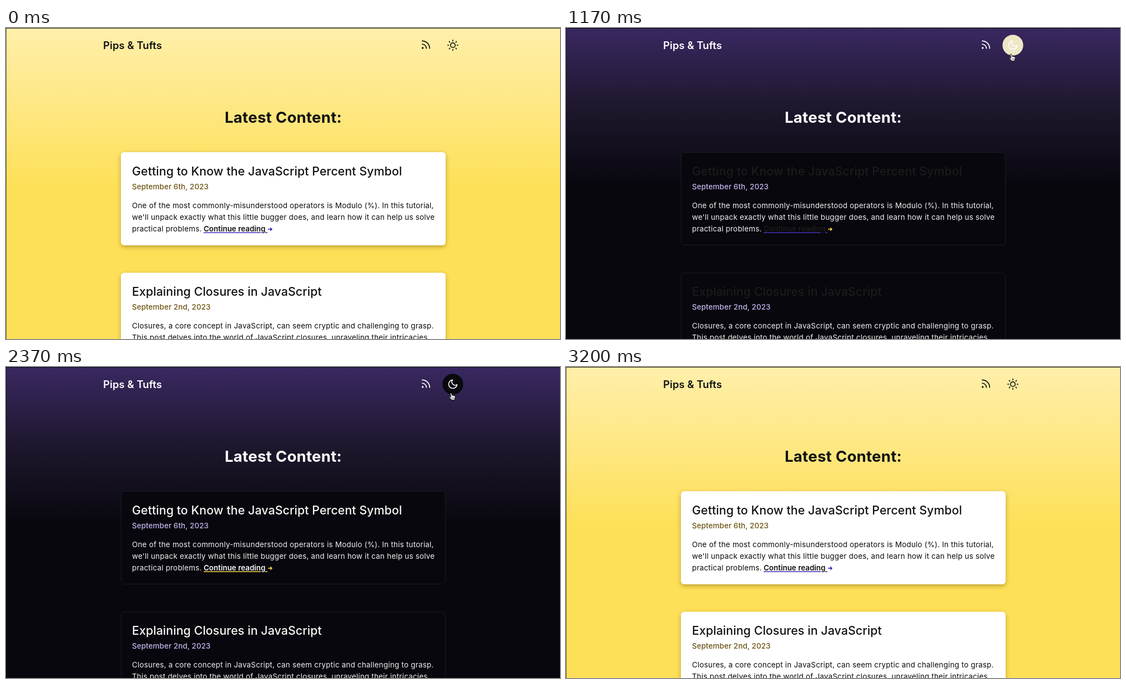
Write an HTML page with a canvas that moves like this. It is 998x561 px and loops after 3530 ms.

```html
<!DOCTYPE html>
<html lang="en">
<head>
<meta charset="utf-8">
<title>Theme toggle</title>
<style>
  html, body { margin: 0; width: 100%; height: 100%; overflow: hidden; }
  canvas { display: block; }
</style>
</head>
<body>
<canvas id="stage" width="998" height="561"></canvas>
<script>
const ctx = document.getElementById('stage').getContext('2d');
const W = 998, H = 561, LOOP = 3530;
const TO_DARK = 1170, TO_LIGHT = 2500, FADE = 200;
const BUTTON = { x: 805, y: 31, r: 18.7 };

const LIGHT = {
  sky: [255, 239, 170], middle: [254, 231, 128], ground: [254, 224, 88],
  ink: '#111111', body: '#0c0c0c', date: '#6b5312', arrow: '#3a14b4',
  edge: 'rgba(40,35,20,.7)', top: '#2a2618'
};
const DARK = {
  sky: [57, 40, 97], middle: [29, 22, 43], ground: [8, 7, 14],
  ink: '#ffffff', body: '#f1f1f3', date: '#c6b6ee', arrow: '#ffda4c',
  edge: 'rgba(0,0,0,.6)', top: '#08070c'
};
// Properties that fade between themes instead of switching at once
const FADING = {
  link: [[17, 17, 17], [247, 247, 247]],
  underline: [[64, 42, 188], [255, 218, 76]],
  button: [[248, 241, 207], [10, 9, 14]]
};

const CARDS = [
  {
    y: 224, title: 'Getting to Know the JavaScript Percent Symbol', date: 'September 6th, 2023',
    lines: [
      'One of the most commonly-misunderstood operators is Modulo (%). In this tutorial,',
      "we'll unpack exactly what this little bugger does, and learn how it can help us solve",
      'practical problems.'
    ]
  },
  {
    y: 441.5, title: 'Explaining Closures in JavaScript', date: 'September 2nd, 2023',
    lines: [
      'Closures, a core concept in JavaScript, can seem cryptic and challenging to grasp.',
      'This post delves into the world of JavaScript closures, unraveling their intricacies'
    ]
  }
];

const RSS = new Path2D('M4 11a9 9 0 0 1 9 9M4 4a16 16 0 0 1 16 16M6 19a1 1 0 1 1-2 0a1 1 0 1 1 2 0');
const MOON = new Path2D('M21 12.79A9 9 0 1 1 11.21 3 7 7 0 0 0 21 12.79z');
const SUN = new Path2D();
SUN.arc(12, 12, 5, 0, Math.PI * 2);
for (let i = 0; i < 8; i++) {
  const c = Math.cos(i * Math.PI / 4), s = Math.sin(i * Math.PI / 4);
  SUN.moveTo(12 + 9 * c, 12 + 9 * s);
  SUN.lineTo(12 + 11 * c, 12 + 11 * s);
}
const HAND = new Path2D('M2.4 1.4Q2 0 3.2 0Q4.4 0 4.8 1.3L5.6 4.4Q6.4 3.6 7.4 4.5Q8.4 4 9.2 5Q10.7 4.7 11.1 6.1Q11.6 8.3 10.5 10.3L10 12.6H4.8Q4 11 2 9.2Q.2 7.4 .5 6.6Q1.2 5.8 2.6 7.2L3.6 7.8Z');
const POINTER = new Path2D('M0 0V12.6L2.9 9.9L4.9 14.4L6.9 13.5L5 9.2H9Z');

const clamp = v => Math.min(1, Math.max(0, v));
const span = (t, start, length) => clamp((t - start) / length);
const smooth = p => p * p * (3 - 2 * p);
const lerp = (a, b, p) => a + (b - a) * p;
const rgb = c => `rgb(${c.map(Math.round).join(',')})`;
const fading = (name, k) => {
  const [a, b] = FADING[name];
  return rgb(a.map((v, i) => lerp(v, b[i], k)));
};

function text(str, x, y, size, weight, color, spacing = 0, align = 'left') {
  ctx.font = `${weight} ${size}px Inter, "Open Sans", sans-serif`;
  ctx.letterSpacing = spacing + 'px';
  ctx.textAlign = align;
  ctx.fillStyle = color;
  ctx.fillText(str, x, y);
}

// Icons are drawn on a 24-unit grid, centred on (x, y)
function icon(path, x, y, color) {
  ctx.save();
  ctx.translate(x, y);
  ctx.scale(.84, .84);
  ctx.translate(-12, -12);
  ctx.lineWidth = 2;
  ctx.lineCap = ctx.lineJoin = 'round';
  ctx.strokeStyle = color;
  ctx.stroke(path);
  ctx.restore();
}

function background(theme) {
  const fill = ctx.createLinearGradient(0, 0, 0, 285);
  fill.addColorStop(0, rgb(theme.sky));
  fill.addColorStop(.53, rgb(theme.middle));
  fill.addColorStop(1, rgb(theme.ground));
  ctx.fillStyle = fill;
  ctx.fillRect(0, 0, W, H);
  ctx.fillStyle = theme.edge;
  ctx.fillRect(0, 0, 1, H);
  ctx.fillStyle = theme.top;
  ctx.fillRect(0, 0, W, 1);
}

function panel(y, dark) {
  ctx.save();
  ctx.beginPath();
  if (dark) {
    ctx.roundRect(207.5, y + .5, 584, 167, 6);
    ctx.fillStyle = '#08070d';
    ctx.strokeStyle = '#1d1b25';
    ctx.lineWidth = 1;
    ctx.fill();
    ctx.stroke();
  } else {
    ctx.roundRect(207, y, 585, 168, 6);
    ctx.shadowColor = 'rgba(105,80,0,.45)';
    ctx.shadowBlur = 9;
    ctx.shadowOffsetY = 3;
    ctx.fillStyle = '#fff';
    ctx.fill();
  }
  ctx.restore();
}

function readMore(theme, k) {
  text('Continue reading', 356, 367, 13.4, 600, fading('link', k));
  ctx.fillStyle = fading('underline', k);
  ctx.fillRect(356, 368.4, 103, 1.5);
  ctx.fillRect(467, 368.4, 4, 1.5);
  ctx.strokeStyle = theme.arrow;
  ctx.lineWidth = 1.4;
  ctx.beginPath();
  ctx.moveTo(472, 363);
  ctx.lineTo(479, 363);
  ctx.moveTo(476, 360.2);
  ctx.lineTo(479, 363);
  ctx.lineTo(476, 365.8);
  ctx.stroke();
}

function card({ y, title, date, lines }, theme, k) {
  panel(y, theme === DARK);
  text(title, 227, y + 41.5, 21.3, 500, fading('link', k), .1);
  text(date, 227, y + 66.5, 13.4, 500, theme.date, .1);
  lines.forEach((line, i) => text(line, 227, y + 100.5 + i * 21.2, 13.4, 400, theme.body, .23));
}

function cursorAt(t) {
  const rest = { x: 801.5, y: 47 };
  const between = (a, b, p) => ({ x: lerp(a.x, b.x, p), y: lerp(a.y, b.y, p) });
  if (t < 70 || t >= 3140) return null;
  if (t < 570) return between({ x: 981, y: 119 }, rest, smooth(span(t, 70, 500)));
  return between(rest, { x: 972, y: 110 }, smooth(span(t, 2870, 270)));
}

function drawCursor(pos) {
  const over = Math.hypot(pos.x - BUTTON.x, pos.y - BUTTON.y) < BUTTON.r;
  const shape = over ? HAND : POINTER;
  ctx.save();
  ctx.translate(pos.x - (over ? 3.5 : 0), pos.y);
  ctx.lineJoin = 'round';
  ctx.lineWidth = over ? 1 : 1.6;
  ctx.strokeStyle = over ? '#111' : '#fff';
  ctx.fillStyle = over ? '#f6f6f6' : '#111';
  if (over) {
    ctx.fill(shape);
    ctx.stroke(shape);
    ctx.beginPath();
    for (const x of [5.8, 7.5, 9.2]) {
      ctx.moveTo(x, 8);
      ctx.lineTo(x, 10.6);
    }
    ctx.lineWidth = .6;
    ctx.stroke();
  } else {
    ctx.stroke(shape);
    ctx.fill(shape);
  }
  ctx.restore();
}

function draw(t) {
  const dark = t >= TO_DARK && t < TO_LIGHT;
  const theme = dark ? DARK : LIGHT;
  // Fades are already slightly under way at the moment of the switch
  const progress = start => smooth(span(t, start - 25, FADE + 10));
  const k = dark ? progress(TO_DARK) : t >= TO_LIGHT ? 1 - progress(TO_LIGHT) : 0;
  const hover = smooth(span(t, 510, 190)) * (1 - smooth(span(t, 2910, 270)));

  background(theme);
  text('Pips & Tufts', 175, 37.5, 18.4, 600, theme.ink, .1);
  text('Latest Content:', 499.5, 171, 27.6, 700, theme.ink, .25, 'center');
  icon(RSS, 756.5, 30.1, theme.ink);

  ctx.globalAlpha = hover;
  ctx.fillStyle = fading('button', k);
  ctx.beginPath();
  ctx.arc(BUTTON.x, BUTTON.y, BUTTON.r, 0, Math.PI * 2);
  ctx.fill();
  ctx.globalAlpha = 1;
  icon(dark ? MOON : SUN, BUTTON.x, BUTTON.y, theme.ink);

  CARDS.forEach(c => card(c, theme, k));
  readMore(theme, k);

  const pos = cursorAt(t);
  if (pos) drawCursor(pos);
}

const start = performance.now();
function tick() {
  draw((performance.now() - start) % LOOP);
  requestAnimationFrame(tick);
}
tick();
</script>
</body>
</html>
```
